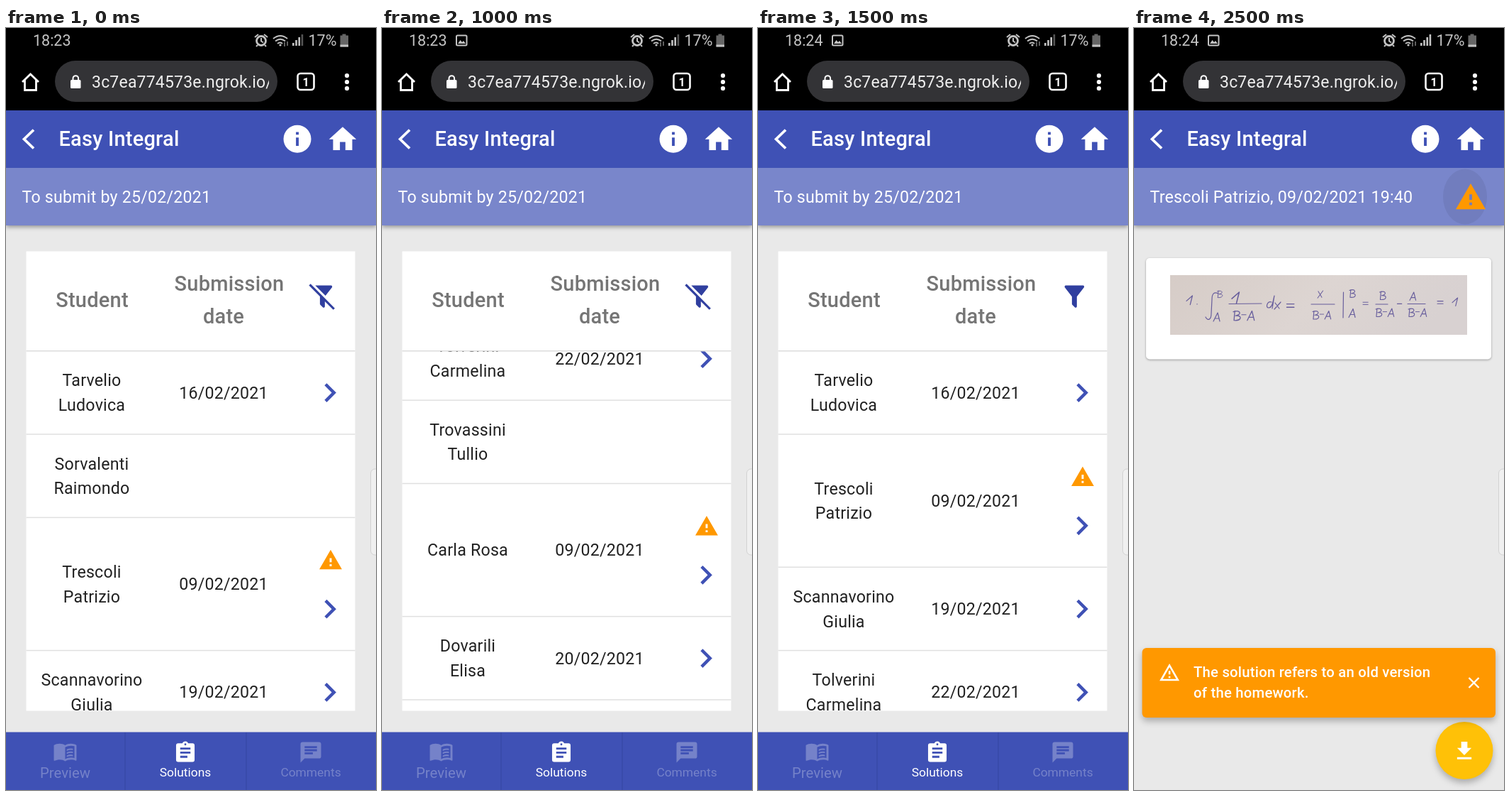
An HTML page for the animation above (3000 ms loop, 522x1073 px).

```html
<!DOCTYPE html>
<html lang="en">
<head>
<meta charset="utf-8">
<title>Homework solutions</title>
<style>
  html, body { margin: 0; width: 100%; height: 100%; overflow: hidden; background: #e9e9e9; }
  svg { display: block; font-family: Roboto, sans-serif; }
  .status { font-size: 21.5px; }
  .url { font-size: 23px; letter-spacing: .2px; }
  .count { font-size: 16px; font-weight: 700; }
  .body { font-size: 23.2px; letter-spacing: .22px; }
  .head { font-size: 29px; font-weight: 500; letter-spacing: .22px; }
  .tab { font-size: 17.4px; }
  .bigtab { font-size: 20.3px; }
  .toast { font-size: 20.3px; font-weight: 500; letter-spacing: .22px; }
  .mid { text-anchor: middle; }
  .line { fill: none; }
  .high { filter: drop-shadow(0 2px 3px #0006); }
  .float { filter: drop-shadow(0 5px 5px #0004); }
  .low { filter: drop-shadow(0 1px 1.5px #0005); }
  .ink { fill: none; stroke: #675d9c; stroke-width: 1.2; stroke-linecap: round; stroke-linejoin: round; }
</style>
</head>
<body>
<svg id="stage" width="522" height="1073"></svg>
<script>
const STEP = 500, STEPS = 6;
const INDIGO = '#3f51b5', LIGHT = '#7986cb', ORANGE = '#ff9800', DIM = '#7582c9';

// name lines, submission date, outdated flag
const students = [
  [['Tarvelio', 'Ludovica'], '16/02/2021'],
  [['Sorvalenti', 'Raimondo']],
  [['Trescoli', 'Patrizio'], '09/02/2021', true],
  [['Scannavorino', 'Giulia'], '19/02/2021'],
  [['Tolverini', 'Carmelina'], '22/02/2021'],
  [['Trovassini', 'Tullio']],
  [['Carla Rosa'], '09/02/2021', true],
  [['Dovarili', 'Elisa'], '20/02/2021'],
];

// icons on a 24-unit grid
const icons = {
  info: 'M12 2a10 10 0 1 0 0 20 10 10 0 0 0 0-20zm1 15h-2v-6h2zm0-8h-2V7h2z',
  home: 'M10 20v-6h4v6h5v-8h3L12 3 2 12h3v8z',
  next: 'M10 6 8.59 7.41 13.17 12l-4.58 4.59L10 18l6-6z',
  warn: 'M1 21h22L12 2zm12-3h-2v-2h2zm0-4h-2v-4h2z',
  warnLine: 'M12 6l7.5 13h-15zM12 2 1 21h22zm1 14h-2v2h2zm0-6h-2v4h2z',
  filter: 'M14 12v7.9q0 .5-.3.8-.7.6-1.4 0l-2-2q-.3-.3-.3-.8V12L4.2 4.6Q3.7 3.300 5 3h14q1.300.3.8 1.600z',
  filterOff: 'M2.400 1.700 1.100 3 10 11.900v6q0 .5.3.8l2 2q.7.6 1.400 0 .3-.3.3-.8v-4l6.800 6.800 1.300-1.200zM6.200 3H19q1.300.3.8 1.600l-5.300 6.700z',
  book: 'M21 5c-3-.9-6.6-.7-9 1-2.9-2.1-8.1-2-11 0v14.65q.1.6.75.45C5 19.6 9.2 19.6 12 21.5c2.7-1.7 7.3-2.1 10.25-.45q.7.1.75-.55V6q-.9-.7-2-1zm0 13.5c-2.9-.9-6.7-.4-9 1V8c2.3-1.4 6.1-1.9 9-1zM13.5 10q3-1.3 6-.7v1.4q-3-.6-6 .8zm0 3q3-1.3 6-.7v1.4q-3-.6-6 .8zm0 3q3-1.3 6-.7v1.4q-3-.6-6 .8z',
  tasks: 'M19 3h-4.18a3 3 0 0 0-5.64 0H5a2 2 0 0 0-2 2v14a2 2 0 0 0 2 2h14a2 2 0 0 0 2-2V5a2 2 0 0 0-2-2zm-7 0a1 1 0 0 1 0 2 1 1 0 0 1 0-2zm2 14H7v-2h7zm3-4H7v-2h10zm0-4H7V7h10z',
  chat: 'M20 2H4a2 2 0 0 0-2 2v18l4-4h14a2 2 0 0 0 2-2V4a2 2 0 0 0-2-2zM6 9h12v2H6zm8 5H6v-2h8zm4-6H6V6h12z',
  download: 'M19 9h-4V3H9v6H5l7 7zM5 18v2h14v-2z',
};

const icon = (name, x, y, scale, fill) =>
  `<path transform="translate(${x} ${y}) scale(${scale})" fill="${fill}" fill-rule="evenodd" d="${icons[name]}"/>`;
const text = (s, x, y, cls, fill) => `<text x="${x}" y="${y}" class="${cls}" fill="${fill}">${s}</text>`;
const rect = (x, y, w, h, fill, more = '') =>
  `<rect x="${x}" y="${y}" width="${w}" height="${h}" fill="${fill}" ${more}/>`;
const line = (d, stroke, width) => `<path class="line" d="${d}" stroke="${stroke}" stroke-width="${width}"/>`;

function statusBar(step) {
  const grey = '#c4c4c4';
  const bars = [4, 8, 12, 16].map((h, i) =>
    rect(404 + i * 4.2, 25 - h, 2.6, h, i < 3 || step > 3 ? grey : '#555')).join('');
  const picture = rect(105, 10.5, 14.5, 14, 'none', `rx="1.5" stroke="${grey}" stroke-width="2"`) +
    `<path fill="${grey}" d="M107 22l3.500-5 2.500 3 2-2 3 4z"/>`;
  return rect(0, 0, 522, 116, '#000') +
    text(step < 3 ? '18:23' : '18:24', 38, 25, 'status', grey) + text('17%', 426.5, 25, 'status', grey) +
    (step ? picture : '') +
    `<circle cx="360" cy="18" r="6.5" fill="none" stroke="${grey}" stroke-width="2.8"/>` +
    line('M360 14v4.5l3 2M351 13l5-4M369 13l-5-4M355 24l-2 2M365 24l2 2', grey, 2) +
    line('M377 15q10-8 20 0M380 18.5q7-5.5 14 0M383 22q4-3 7 0', grey, 2) +
    `<circle cx="387" cy="24" r="1.6" fill="${grey}"/>` +
    line('M393 20v6M397 19v6', '#777', 1.6) + bars +
    rect(474.5, 8.5, 5, 3, '#666') + rect(471.5, 10.5, 11.5, 16, '#666') + rect(471.5, 23.5, 11.5, 3, grey);
}

const browserBar = () =>
  line('M23 76 34.5 65 46 76M26.5 73v14.5h16V73', '#fff', 2.8) +
  rect(69, 46, 314, 58, '#333336', 'rx="29"') +
  rect(91, 73, 14.5, 12, '#fff', 'rx="1.5"') +
  line('M94.5 74v-3a3.8 3.8 0 0 1 7.6 0v3', '#fff', 2) +
  `<svg x="120" y="50" width="251" height="50">${text('3c7ea774573e.ngrok.io/', 1, 34, 'url', '#eee')}</svg>` +
  rect(411.5, 64, 23, 23, 'none', 'rx="4" stroke="#fff" stroke-width="2.6"') +
  text('1', 423, 81.5, 'count mid', '#fff') +
  [67, 76, 85].map(y => `<circle cx="481" cy="${y}" r="3.1" fill="#fff"/>`).join('');

function appBar(step) {
  const detail = step > 3;
  const title = detail ? 'Trescoli Patrizio, 09/02/2021 19:40' : 'To submit by 25/02/2021';
  return rect(0, 116, 522, 162, LIGHT, 'class="high"') + rect(0, 116, 522, 81, INDIGO) +
    line('M39 143.5 25.5 156.5 39 169.5', '#fff', 3.8) +
    text('Easy Integral', 74.5, 165.5, 'head', '#fff') +
    icon('info', 387.6, 132.8, 1.95, '#fff') + icon('home', 451.8, 133.5, 1.93, '#fff') +
    text(title, 22.5, 245.5, 'body', '#fff') +
    (step === 5 ? '<ellipse cx="467" cy="237.5" rx="31" ry="39" fill="#0001"/>' : '') +
    (detail ? icon('warn', 452.1, 215.2, 1.91, ORANGE) : '');
}

function row([names, date, old], top, height) {
  const mid = top + height / 2, shift = old ? 35 : 0;
  return names.map((name, i) =>
      text(name, 121, mid + 8 + (i - (names.length - 1) / 2) * 34.8, 'body mid', '#212121')).join('') +
    (date ? text(date, 307, mid + 8, 'body mid', '#212121') +
      icon('next', 430.2, mid + shift - 26.8, 2.23, INDIGO) : '') +
    (old ? icon('warn', 440.6, mid - 51.3, 1.45, ORANGE) : '') +
    rect(28.5, top + height - 1, 464, 1.5, '#e0e0e0');
}

function table(step) {
  const filtered = step === 3;
  let top = 455 - [0, 194.5, 587, 0][step];
  const rows = students.filter(s => !filtered || s[1]).map(s => {
    const height = s[2] ? 187.2 : 117.3;
    top += height;
    return row(s, top - height, height);
  }).join('');
  return rect(28.5, 314.5, 464, 647, '#fff') +
    text('Student', 121.5, 393, 'head mid', '#757575') +
    text('Submission', 315, 370, 'head mid', '#757575') +
    text('date', 307, 416, 'head mid', '#757575') +
    icon(filtered ? 'filter' : 'filterOff', 425.5, 357.3, 1.74, '#303f9f') +
    `<clipPath id="list">${rect(28, 455, 465, 506.5, '#000')}</clipPath><g clip-path="url(#list)">${rows}</g>` +
    rect(28.5, 454, 464, 1.5, '#dcdcdc');
}

const tabs = () =>
  rect(0, 991.5, 522, 82, INDIGO) + line('M168 992v81M339 992v81', '#394aa8', 1.5) +
  icon('book', 66.1, 1001.2, 1.45, DIM) + text('Preview', 83.5, 1055.5, 'bigtab mid', DIM) +
  icon('tasks', 235.6, 1003, 1.45, '#fff') + text('Solutions', 253, 1054, 'tab mid', '#fff') +
  icon('chat', 412.6, 1002.5, 1.45, DIM) + text('Comments', 430, 1054, 'tab mid', DIM);

// handwritten glyphs inside a 10 by 12 box
const pen = {
  A: 'M0 12 6 0 9 12M2 8h6',
  B: 'M2 0 1 12M0 1C10-2 11 5 3 6 12 5 11 13 1 12',
  x: 'M1 1 7 11M9 0 0 12',
  1: 'M0 7 8 0 5 12',
  '-': 'M1 6h7',
  '=': 'M0 4h9M0 8h9',
};
const glyph = (c, x, y, s = 1) => `<path transform="translate(${x} ${y}) scale(${s})" d="${pen[c]}"/>`;
const bMinusA = (x, y, s = .95) => glyph('B', x, y, s) + glyph('-', x + 10 * s, y, s * .8) + glyph('A', x + 18 * s, y, s);

const solution = () =>
  rect(17, 324, 487, 142.5, '#fff', 'rx="5" class="low"') +
  '<linearGradient id="paper" x2="1" y2=".2"><stop stop-color="#d6ccc7"/><stop offset=".55" stop-color="#ddd5d2"/><stop offset="1" stop-color="#d8d1d1"/></linearGradient>' +
  rect(51, 348, 419, 84, 'url(#paper)') +
  `<g class="ink">${glyph(1, 74, 377, 1.05)}<path d="M89 388.5v.5M119 374c-6-3-9 0-9 8l-1 20c0 9-5 11-8 5M134 388.5l46-.5M250 389h33M295.5 372l-.5 36M341 389h17M386 388.5h25"/>` +
  glyph('B', 117.5, 370, .8) + glyph('A', 112, 401) +
  glyph(1, 138, 372, 1.3) + bMinusA(140, 398.5, 1.1) +
  '<path d="M194 386c-6-2-9 8-4 8 3 0 5-4 6-8l2-9-3 18M199 387l6 8M207 386l-9 10"/>' + glyph('=', 215.5, 384, 1.15) +
  glyph('x', 259, 370, .85) + bMinusA(252, 398.5) +
  glyph('B', 304, 368.5, .9) + glyph('A', 303, 395.5) + glyph('=', 323, 383, .8) +
  glyph('B', 346.5, 371, .95) + bMinusA(341, 395) + glyph('-', 370.5, 383, .9) +
  glyph('A', 389, 372, .95) + bMinusA(387, 395) + glyph('=', 428, 381, .9) + glyph(1, 449, 380, .95) + '</g>' +
  '<circle cx="466" cy="1017.5" r="40.5" fill="#ffc107" class="float"/>' + icon('download', 448.6, 1000.7, 1.45, '#fff');

const toast = () =>
  rect(11.5, 873, 498.5, 98, ORANGE, 'rx="6" class="float"') +
  icon('warnLine', 34.8, 892.5, 1.27, '#fff') +
  text('The solution refers to an old version', 84, 914, 'toast', '#fff') +
  text('of the homework.', 84, 943, 'toast', '#fff') +
  line('M472.5 915l14 14m0-14-14 14', '#fff', 2.4);

const edgeHandle = () => rect(514.5, 621, 20, 121, '#f0f0f0', 'rx="6" stroke="#d2d2d2"');

const scene = step => rect(0, 0, 522, 1073, '#e9e9e9') +
  (step < 4 ? table(step) + tabs() : solution()) + (step === 5 ? toast() : '') +
  appBar(step) + statusBar(step) + browserBar() + edgeHandle();

const stage = document.getElementById('stage');
let shown = -1;
function draw() {
  const step = Math.floor(performance.now() / STEP) % STEPS;
  if (step !== shown) stage.innerHTML = scene(shown = step);
  requestAnimationFrame(draw);
}
draw();
</script>
</body>
</html>
```
